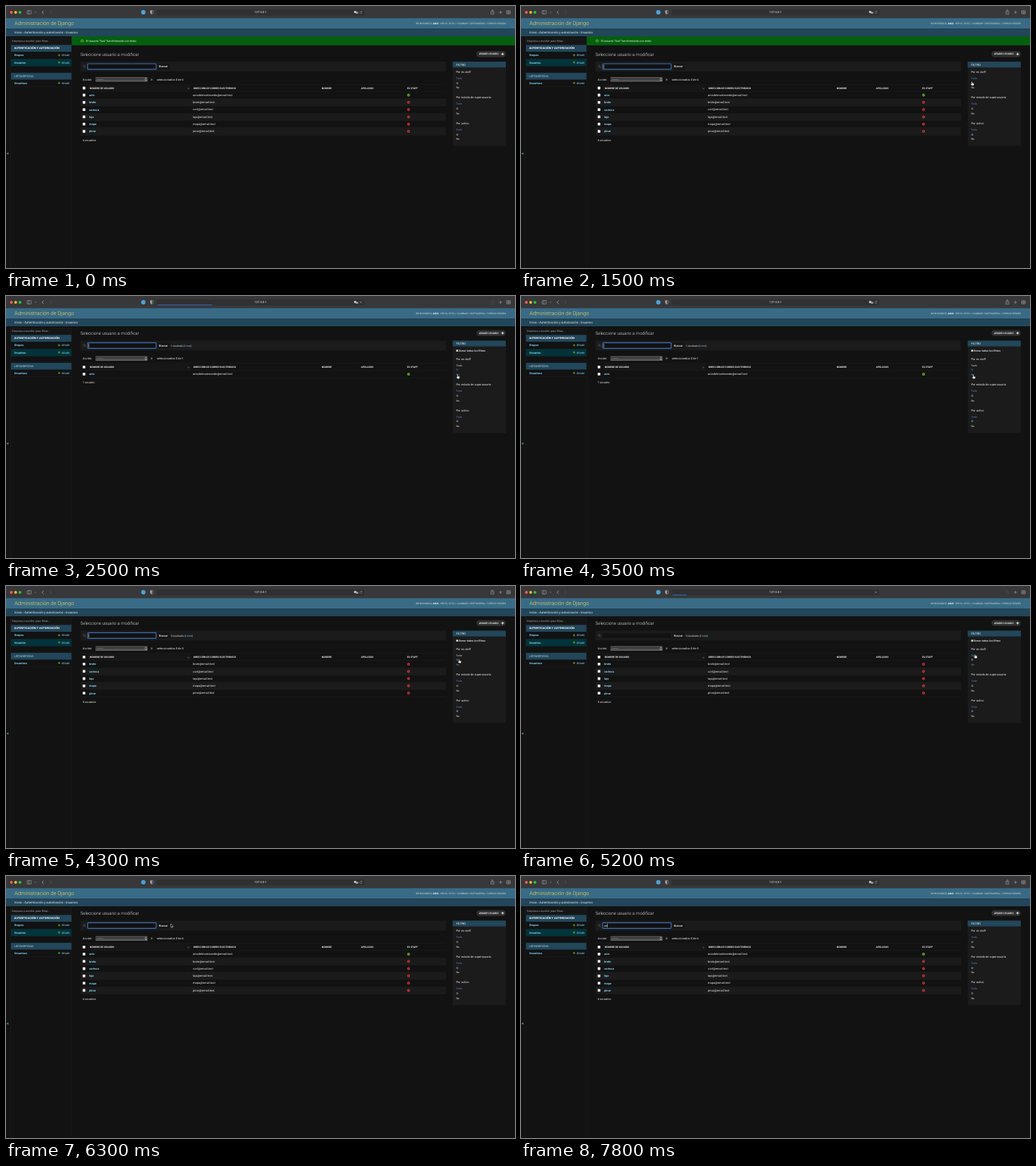
Write an HTML page that moves like this. It is 722 px wide and 372 px high and loops after 8000 ms.

```html
<!DOCTYPE html>
<html lang="es">
<head>
<meta charset="utf-8">
<title>Administración de Django</title>
<style>
  html, body { margin: 0; width: 100%; height: 100%; overflow: hidden; background: #121212; }
  svg { display: block; width: 722px; height: 372px; }
  text { font-family: Roboto, sans-serif; white-space: pre; text-rendering: geometricPrecision; }
</style>
</head>
<body>
<svg id="stage" viewBox="0 0 722 372">
  <defs>
    <linearGradient id="select" x2="0" y2="1">
      <stop offset="0" stop-color="#777"/>
      <stop offset=".25" stop-color="#333"/>
      <stop offset=".6" stop-color="#484848"/>
      <stop offset="1" stop-color="#666"/>
    </linearGradient>
  </defs>
  <g id="frame"></g>
  <g id="view"></g>
</svg>
<script>
const LOOP = 8000, STEP = 100;
const SIZE = { small: 3.45, link: 3.76, body: 4.07, mid: 4.39, title: 6.2, brand: 7.5 };
const C = {
  bar: '#38383a', header: '#396b86', primary: '#22465a', panel: '#1b1b1b', line: '#272727',
  text: '#eee', quiet: '#dcdcdc', dim: '#8a8a8a', link: '#81d4fa', hover: '#4ac1f7',
  selected: '#5b86c4', yes: '#5fb52b', no: '#d8363c', add: '#70bf2b'
};

const USERS = [
  ['anis', 'anisdelmonteverde'], ['brote', 'brote'], ['corteza', 'cort'],
  ['laja', 'laja'], ['mapa', 'mapa'], ['pinar', 'pinar']
].map(([name, mail], i) => ({ name, mail: mail + '@email.test', staff: i === 0 }));

const FILTERS = ['Por es staff', 'Por estado de superusuario', 'Por activo'];
const OPTIONS = ['Todo', 'Sí', 'No'];

// Each page is shown from `from`; `choice` is the active staff filter.
const PAGES = [
  { from: 0, choice: 0, message: true },
  { from: 2500, choice: 1 },
  { from: 4100, choice: 2 },
  { from: 5400, choice: 0 }
];
const LOADS = [
  { start: 2200, swap: 2500, end: 2600 },
  { start: 3800, swap: 4100, end: 4200 },
  { start: 5100, swap: 5400, end: 5800 }
];
const CARET_ON = [[200, 700], [1200, 1700], [2500, 3000], [3500, 4000], [4100, 4600],
  [5100, 6000], [6500, 7000], [7500, 8000]];
const POINTER = [
  [700, 660, 360], [1000, 671, 246], [1200, 656, 165], [1500, 639.5, 107.3], [1700, 639.5, 108.5],
  [2000, 640.5, 111.8], [2800, 640.5, 111.8], [3100, 641.5, 112], [4000, 641.5, 112],
  [4300, 642.7, 104], [4600, 644, 97.05], [5500, 644, 97.05], [5900, 433, 72],
  [6200, 262, 67], [6500, 177.3, 71]
];

const within = (t, [a, b]) => t >= a && t < b;

function text(x, y, str, size = SIZE.body, fill = C.text, extra = '') {
  return `<text x="${x}" y="${y + size * 0.35}" font-size="${size}" fill="${fill}" ${extra}>${str}</text>`;
}
const BOLD = 'font-weight="700"', MEDIUM = 'font-weight="500"', LIGHT = 'font-weight="300"';

function rect(x1, y1, x2, y2, fill, extra = '') {
  return `<rect x="${x1}" y="${y1}" width="${x2 - x1}" height="${y2 - y1}" fill="${fill}" ${extra}/>`;
}
function path(d, stroke, width = 0.6, fill = 'none') {
  return `<path d="${d}" stroke="${stroke}" stroke-width="${width}" fill="${fill}" stroke-linejoin="round" stroke-linecap="round"/>`;
}
const circle = (x, y, r, fill) => `<circle cx="${x}" cy="${y}" r="${r}" fill="${fill}"/>`;
const rule = (x1, x2, y) => rect(x1, y - 0.15, x2, y + 0.15, C.line);
const plus = (x, y, r, color, w = 0.8) => path(`M${x - r} ${y}h${2 * r}M${x} ${y - r}v${2 * r}`, color, w);
const checkbox = (x, y) => rect(x, y - 1.9, x + 3.7, y + 1.9, '#f4f4f4', 'rx=".6"');

function sidebar() {
  const row = (y, label) => text(11.8, y, label, SIZE.body, C.link, BOLD) +
    plus(75.3, y, 1.2, C.add) + text(78.7, y, 'Añadir', SIZE.body, C.link);
  return rect(6.4, 43, 6.8, 372, C.line) + rect(92.8, 43, 93.2, 372, C.line) +
    text(1, 208.5, '«', 6, C.link, BOLD) +
    rect(7, 45.2, 92.6, 54, '#151515', `stroke="${C.line}" stroke-width=".3"`) +
    text(8.6, 49.5, 'Empieza a escribir para filtrar...', 3.95, '#a0a0a0') +
    rect(7, 55.2, 92.8, 65, C.primary) +
    text(11.5, 60, 'AUTENTICACIÓN Y AUTORIZACIÓN', 4, '#fff', BOLD) +
    rect(7, 75.2, 92.8, 85.4, '#00343a') +
    row(69.9, 'Grupos') + row(80.1, 'Usuarios') + rule(7, 92.8, 75.1) + rule(7, 92.8, 85.5) +
    rect(7, 94.8, 92.8, 104.5, C.primary) +
    text(11.5, 99.6, 'LISTADEFICHA', 4.1, '#b9dcea') +
    row(109.3, 'Usuarioss') + rule(7, 92.8, 114.6);
}

function frame() {
  const icon = '#b8b8ba', faint = '#58585a';
  return rect(0, 0, 722, 372, '#121212') + rect(0, 0, 722, 17.2, C.bar) +
    ['#ff5f57', '#febc2e', '#28c840'].map((c, i) => circle(7.6 + 6.1 * i, 8.9, 2, c)).join('') +
    path('M30.4 6.6h5.4v4.6h-5.4zM32.3 6.6v4.6', icon, 0.5) +
    path('M40.9 8.5l.9.9.9-.9', icon, 0.5) +
    path('M53.2 6.7l-2 2.2 2 2.2', icon, 0.7) + path('M62.4 6.7l2 2.2-2 2.2', faint, 0.7) +
    circle(194.8, 8.9, 3.1, '#4ba3d8') +
    path('M206.8 6.3l2 .6v2.2q0 1.8-2 2.7-2-.9-2-2.7v-2.2z', icon, 0.5) +
    path('M206.8 6.5v5q-1.8-.9-1.8-2.5v-2z', icon, 0.1, icon) +
    rect(213.7, 4.9, 508.3, 13.2, '#303032', 'rx="1.6"') +
    text(361, 8.9, '127.0.0.1', 4.2, '#eee', 'text-anchor="middle"') +
    plus(701.4, 8.9, 1.8, icon, 0.5) +
    path('M710.6 6.7h4.6v4.4h-4.6zM712.9 6.7v4.4M710.6 8.9h4.6', icon, 0.5) +
    rect(0, 17.2, 722, 32.2, C.header) +
    text(12, 24.2, 'Administración de Django', SIZE.brand, '#f5dd5d', LIGHT) +
    text(709, 24.5, 'BIENVENIDOS, <tspan font-weight="700" fill="#fff">ANIS</tspan>. VER EL SITIO / CAMBIAR CONTRASEÑA / CERRAR SESIÓN',
      3.4, '#d5e0cf', 'text-anchor="end" letter-spacing=".1"') +
    rect(0, 32.2, 722, 43, C.primary) +
    text(12, 37.6, 'Inicio › Autenticación y autorización › Usuarios', SIZE.mid, '#e8f0f3') +
    sidebar();
}

function browserState(t) {
  const load = LOADS.find(l => within(t, [l.start, l.end]));
  const waiting = load && t < load.swap;
  let out = path('M688.8 7.9h-1v3.7h4.2v-3.7h-1M689.9 9.6v-4M688.7 6.6l1.2-1.2 1.2 1.2', load ? '#505052' : '#b8b8ba', 0.5);
  if (!waiting) {
    out += rect(493.8, 7, 496.8, 10, '#ccc', 'rx=".6"') + rect(496.2, 8.2, 499.6, 11, '#999', 'rx=".6"');
  }
  if (load) {
    const width = waiting ? 10 + 10 * (t - load.start) / STEP : 77 + 60 * Math.max(0, t - load.swap - STEP) / STEP;
    out += rect(215, 12.4, 215 + width, 13.2, '#2f7fe0') +
      path('M502.4 7.9l2 2M504.4 7.9l-2 2', '#bbb', 0.5);
  } else {
    out += path('M504.6 8a1.6 1.6 0 1 0 .4 1.3M504.8 6.9v1.3h-1.3', '#aaa', 0.4);
  }
  return out;
}

function searchBar(t, page, count) {
  const focused = !LOADS.some(l => within(t, [l.start, l.swap]));
  const typed = t >= 7800 ? 'an' : t >= 7500 ? 'a' : '';
  const caretX = 117.5 + typed.length * 2.25;
  let out = rect(105.7, 63.4, 624, 77.3, C.panel) +
    `<circle cx="110.9" cy="69.9" r="1.4" fill="none" stroke="#666" stroke-width=".5"/>` + path('M112 71l1.2 1.3', '#666', 0.5) +
    rect(115.8, 66.4, 213, 74.3, '#121212', focused
      ? 'rx="1" stroke="#3d6fb8" stroke-width="1.2"' : 'rx="1" stroke="#2c2c2c" stroke-width=".3"') +
    text(117.8, 70.5, typed) +
    rect(214.8, 66.4, 232, 74.3, '#151515', 'rx="1"') + text(217, 70.3, 'Buscar', SIZE.body, C.text, MEDIUM);
  if (focused && CARET_ON.some(span => within(t, span))) out += rect(caretX, 67.8, caretX + 0.5, 73, '#fff');
  if (page.choice) {
    out += text(233.7, 70.4, `${count} resultado${count > 1 ? 's' : ''} (<tspan fill="${C.link}">6 total</tspan>)`, 3.4);
  }
  return out;
}

function actions(count) {
  return text(108.8, 88.6, 'Acción:') +
    rect(126.8, 85.4, 201, 92, 'url(#select)', 'rx="1"') +
    text(129, 88.7, '---------', 3.8, '#ddd') +
    path('M197.4 88l1-1.2 1 1.2M197.4 89.4l1 1.2 1-1.2', '#fff', 0.6) +
    rect(203.6, 85.2, 210, 92.2, '#151515', 'rx="1"') + text(205.4, 88.7, 'Ir') +
    text(213.7, 88.7, `seleccionados 0 de ${count}`);
}

function staffIcon(x, y, staff) {
  return circle(x, y, 2, staff ? C.yes : C.no) + path(staff
    ? `M${x - 0.9} ${y}l.7.8 1.2-1.5` : `M${x - 0.7} ${y - 0.7}l1.4 1.4m0-1.4l-1.4 1.4`, '#161616', 0.5);
}

function table(users) {
  const heads = [[118.8, 'NOMBRE DE USUARIO'], [265.8, 'DIRECCIÓN DE CORREO ELECTRÓNICO'],
    [447.8, 'NOMBRE'], [503.4, 'APELLIDOS'], [569, 'ES STAFF']];
  let out = rule(105.7, 624, 95.9) + rect(116, 96, 262, 105.6, '#161616') + checkbox(108.8, 100.9) +
    heads.map(([x, s]) => text(x, 100.9, s, SIZE.small, C.text, BOLD)).join('') +
    path('M257.8 101.2l1 .9 1-.9', '#aaa', 0.5) + rule(105.7, 624, 105.7);
  users.forEach((user, i) => {
    const y = 110.9 + 10.3 * i;
    if (i % 2) out += rect(105.7, y - 5.1, 624, y + 5.1, C.panel);
    out += checkbox(108.8, y) + text(118, y, user.name, SIZE.body, C.link, BOLD) +
      text(265, y - 0.1, user.mail) + staffIcon(571, y, user.staff) + rule(105.7, 624, y + 5.15);
  });
  const n = users.length;
  return out + text(108.8, 112.7 + 10.3 * n, `${n} usuario${n > 1 ? 's' : ''}`);
}

function optionY(page, group, option) {
  return 86.9 + (page.choice ? 11.4 : 0) + 36.5 * group + 6.8 * option;
}

function filters(page, hovered) {
  const shift = page.choice ? 11.4 : 0;
  let out = rect(633.6, 63.4, 709, 183.2 + shift, C.panel) + rect(633.6, 63.4, 709, 71.6, C.primary) +
    text(638.4, 67.5, 'FILTRO', SIZE.mid, C.text);
  if (shift) {
    out += rect(638.6, 76.2, 641.2, 78.9, '#ddd', 'rx=".5"') +
      text(642.2, 77.7, 'Borrar todos los filtros', 3.8, C.text, MEDIUM);
  }
  FILTERS.forEach((title, g) => {
    out += text(638.4, 77.9 + shift + 36.5 * g, title);
    OPTIONS.forEach((label, i) => {
      const active = i === (g ? 0 : page.choice);
      const fill = !g && i === hovered ? C.hover : active ? C.selected : C.quiet;
      out += text(638.4, optionY(page, g, i), label, SIZE.link, fill);
    });
  });
  return out;
}

function pointerAt(t) {
  if (t < POINTER[0][0] || t >= 7500) return null;
  const next = POINTER.findIndex(k => k[0] > t);
  if (next < 0) return POINTER.at(-1).slice(1);
  const [t0, x0, y0] = POINTER[next - 1], [t1, x1, y1] = POINTER[next];
  const k = (t - t0) / (t1 - t0);
  return [x0 + (x1 - x0) * k, y0 + (y1 - y0) * k];
}

function pointer([x, y], kind) {
  const shape = {
    beam: path('M-.9 -2.7q.9 0 .9 .6v4.2q0 .6-.9.6M.9 -2.7q-.9 0-.9.6M0 2.1q0 .6.9.6', '#ddd', 0.5),
    hand: path('M-.5 .2q.5-.7 1 0v1.7l2 .5q.8.3.6 1.3l-.6 1.9h-2.7l-1.7-2.2q.2-.8 1.4 0z', '#111', 0.4, '#fff'),
    arrow: path('M0 0v4.4l1-.9.8 1.8.8-.4-.8-1.7h1.4z', '#fff', 0.45, '#000')
  }[kind];
  return `<g transform="translate(${x} ${y})">${shape}</g>`;
}

function render(t) {
  const page = PAGES.findLast(p => t >= p.from);
  const users = USERS.filter(u => !page.choice || u.staff === (page.choice === 1));
  const dy = page.message ? 15.6 : 0;
  const tip = pointerAt(t);
  const hovered = tip && Math.abs(tip[0] - 642) < 5
    ? OPTIONS.findIndex((_, i) => Math.abs(optionY(page, 0, i) + dy - tip[1]) < 3) : -1;
  const overInput = tip && tip[0] < 213 && tip[1] > 66 && tip[1] < 75;

  let out = browserState(t);
  if (page.message) {
    out += rect(93.2, 43, 722, 55.8, '#04600f') +
      `<circle cx="108" cy="49.4" r="1.8" fill="none" stroke="#9bd32f" stroke-width=".6"/>` +
      path('M107.2 49.4l.6.7 1-1.2', '#9bd32f', 0.5) +
      text(113.4, 49.4, 'El usuario “tiza” fue eliminado con éxito.');
  }
  out += `<g transform="translate(0 ${dy})">` +
    text(105.6, 53.3, 'Seleccione usuario a modificar', SIZE.title, C.text, LIGHT) +
    rect(667.4, 48.4, 709, 56.8, '#303030', 'rx="4.2"') +
    text(671, 52.6, 'AÑADIR USUARIO', SIZE.small, '#fff', MEDIUM) + plus(704.4, 52.7, 1.5, '#fff', 0.9) +
    searchBar(t, page, users.length) + actions(users.length) + table(users) +
    filters(page, hovered) + '</g>';
  if (tip) out += pointer(tip, hovered >= 0 ? 'hand' : overInput ? 'beam' : 'arrow');
  document.getElementById('view').innerHTML = out;
}

document.getElementById('frame').innerHTML = frame();
const start = performance.now();
let shown = -1;
function tick() {
  const t = Math.floor(((performance.now() - start) % LOOP) / STEP) * STEP;
  if (t !== shown) render(shown = t);
  requestAnimationFrame(tick);
}
tick();
</script>
</body>
</html>
```
